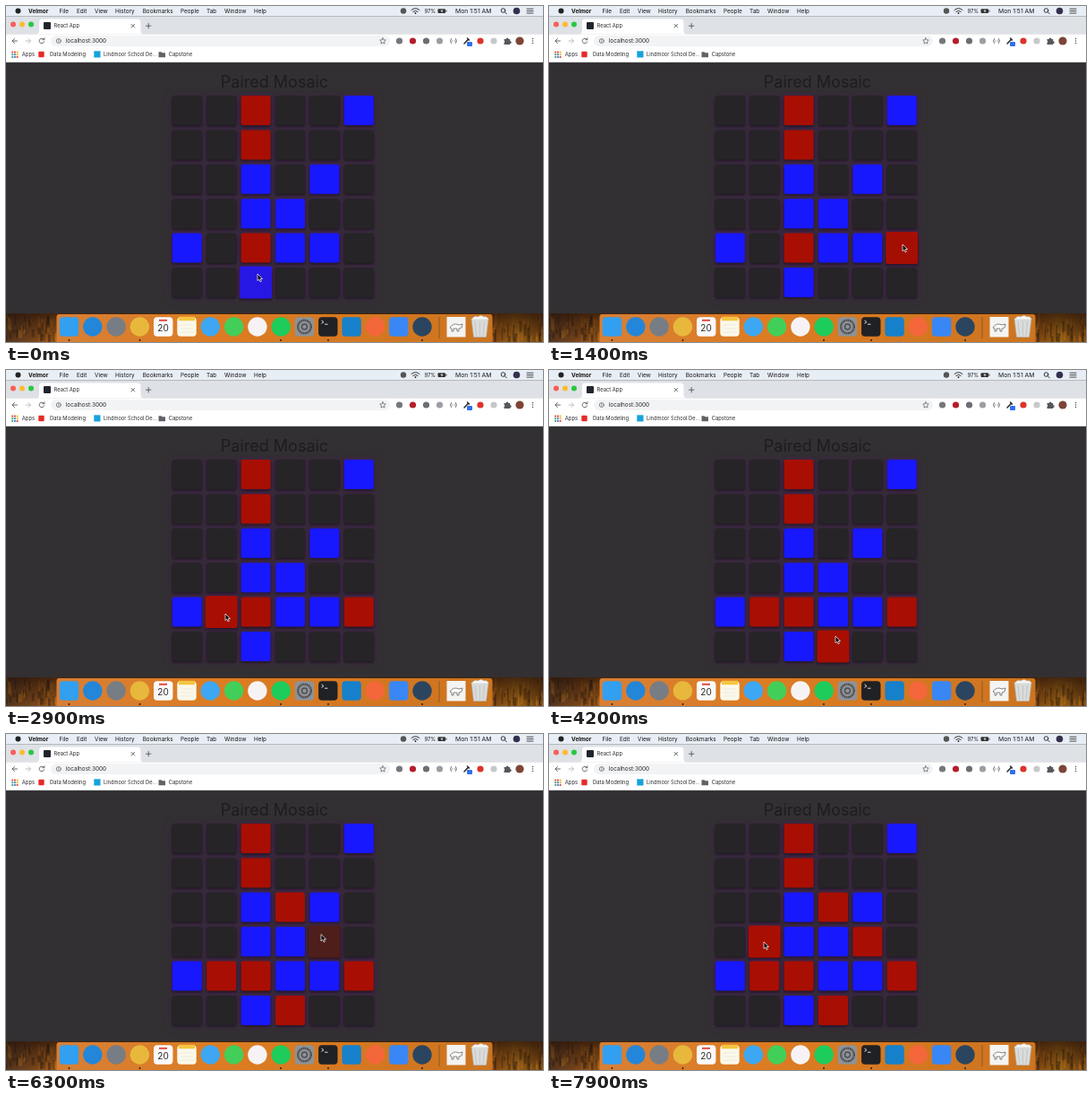
An HTML page that plays this animation: 600 px wide and 375 px high, repeating every 8000 ms.

```html
<!DOCTYPE html>
<html lang="en">
<head>
<meta charset="utf-8">
<title>Paired Mosaic</title>
<style>
  html, body { margin: 0; width: 100%; height: 100%; overflow: hidden; background: #323032; }
  svg { display: block; width: 100vw; height: 100vh; }
  text { font-family: Inter, "Liberation Sans", sans-serif; fill: #2b2b2d; }
  .menu { font-size: 6.4px; fill: #151515; }
  .small { font-size: 5.85px; }
  .line { fill: none; stroke: #56585c; stroke-width: .9; stroke-linecap: round; stroke-linejoin: round; }
</style>
</head>
<body>
<svg viewBox="0 0 600 375" preserveAspectRatio="none">
  <defs>
    <linearGradient id="wall">
      <stop offset="0" stop-color="#5a3a22"/><stop offset=".06" stop-color="#8a4f1c"/>
      <stop offset=".1" stop-color="#a8601a"/><stop offset=".9" stop-color="#8a4a12"/>
      <stop offset=".95" stop-color="#a86a16"/><stop offset="1" stop-color="#7a4612"/>
    </linearGradient>
    <linearGradient id="shade" x2="0" y2="1">
      <stop offset="0" stop-color="#1c0d08" stop-opacity=".7"/>
      <stop offset=".5" stop-color="#1c0d08" stop-opacity=".4"/>
      <stop offset="1" stop-color="#1c0d08" stop-opacity=".1"/>
    </linearGradient>
    <linearGradient id="shelf">
      <stop offset="0" stop-color="#d87f35"/><stop offset=".4" stop-color="#dc7c22"/>
      <stop offset="1" stop-color="#cc7420"/>
    </linearGradient>
    <filter id="soft" x="-20%" y="-20%" width="140%" height="140%"><feGaussianBlur stdDeviation="5"/></filter>
    <filter id="halo" x="-40%" y="-40%" width="180%" height="180%"><feGaussianBlur stdDeviation="2.2"/></filter>
    <filter id="lift" x="-30%" y="-30%" width="160%" height="160%"><feGaussianBlur stdDeviation="1.1"/></filter>
  </defs>

  <!-- page -->
  <rect y="62" width="600" height="282" fill="#323032"/>
  <text x="300" y="90.5" text-anchor="middle" font-size="18" style="fill:#1e1c1e">Paired Mosaic</text>
  <rect x="184" y="99" width="230" height="229" rx="4" fill="#3d2844" opacity=".45" filter="url(#soft)"/>
  <g id="board"></g>

  <!-- menu bar -->
  <rect width="600" height="11.5" fill="#e8eef5"/>
  <circle cx="13.5" cy="5.5" r="3" fill="#222"/>
  <g id="menus"></g>
  <circle cx="444" cy="5.5" r="3.2" fill="#555"/>
  <path class="line" d="M453 4.5q4.5-4 9 0M454.8 6.3q2.7-2.3 5.4 0" style="stroke:#222"/>
  <circle cx="457.5" cy="8" r=".9" fill="#222"/>
  <text class="menu" x="467.5" y="7.8" style="font-size:5.8px">97%</text>
  <rect x="482.5" y="3.2" width="8.5" height="4.8" rx="1" fill="#333"/>
  <rect x="491.4" y="4.6" width="1" height="2" fill="#333"/>
  <path d="M487.5 3.3l-2 2.7h1.5l-.5 2 2-2.8H487z" fill="#e8eef5"/>
  <text class="menu" x="502" y="7.8" style="font-size:6.8px">Mon 1:51 AM</text>
  <circle class="line" cx="555.5" cy="5" r="2.3" style="stroke:#222"/>
  <path class="line" d="M557.3 6.8l2 2" style="stroke:#222"/>
  <circle cx="570.5" cy="5.5" r="3.8" fill="#34304e"/>
  <path class="line" d="M582 3.2h7M582 5.6h7M582 8h7" style="stroke:#333"/>

  <!-- browser window -->
  <rect y="11.5" width="600" height="20" fill="#dee1e6"/>
  <circle cx="8" cy="20.5" r="3" fill="#fb5d57"/>
  <circle cx="18" cy="20.5" r="3" fill="#fcbc2e"/>
  <circle cx="28" cy="20.5" r="3" fill="#2ac840"/>
  <path d="M33 31.5q4 0 4-4V18q0-3.5 3.5-3.5H147q3.5 0 3.5 3.5v9.5q0 4 4 4z" fill="#fff"/>
  <rect x="42" y="18" width="8" height="8" rx="1" fill="#20252d"/>
  <text class="small" x="53.5" y="24.3">React App</text>
  <path class="line" d="M140 20.4l3.6 3.6m0-3.6l-3.6 3.6M156.5 22.2h5.4M159.2 19.5v5.4"/>
  <rect y="31.2" width="600" height="31.6" fill="#fff"/>
  <path class="line" d="M12.5 39h-5.5m2.5-2.6L7 39l2.5 2.6"/>
  <path class="line" d="M22 39h5.5m-2.5-2.6l2.5 2.6-2.5 2.6" style="stroke:#b9bbbe"/>
  <path class="line" d="M42.2 37.2a2.8 2.8 0 1 0 .5 2.6M42.9 35.7v2h-2"/>
  <rect x="50" y="33" width="379" height="12" rx="6" fill="#f1f3f4"/>
  <circle class="line" cx="58.8" cy="39" r="2.5" style="stroke-width:.7"/>
  <path class="line" d="M58.8 38.8v1.3M58.8 37.6v.1" style="stroke-width:.7"/>
  <text x="66.8" y="41.3" font-size="6.4">localhost:3000</text>
  <path class="line" d="M421 35.7l1 2.1 2.3.3-1.7 1.6.4 2.3-2-1.1-2 1.1.4-2.3-1.7-1.6 2.3-.3z" style="stroke-width:.7"/>
  <g id="tools"></g>
  <path class="line" d="M497.5 36.5q-2 2.5 0 5m5-5q2 2.5 0 5M498.8 39h.2m2.3 0h.2"/>
  <path class="line" d="M512 42l4.5-4.8m-1-1.2l2 2" style="stroke:#222;stroke-width:1.4"/>
  <rect x="515" y="40" width="6" height="5" rx="1" fill="#2f6fed"/>
  <path d="M556.5 37h2a1.5 1.5 0 0 1 3 0h1.7v2a1.5 1.5 0 0 1 0 3v1h-6.7v-2a1.5 1.5 0 0 0 0-2.5z" fill="#55585c"/>
  <circle cx="574" cy="39" r="4.6" fill="#7d4437"/>
  <g fill="#55585c"><circle cx="588.5" cy="36.5" r=".8"/><circle cx="588.5" cy="39" r=".8"/><circle cx="588.5" cy="41.5" r=".8"/></g>
  <g id="apps"></g>
  <text class="small" x="17.8" y="56.2">Apps</text>
  <rect x="36.3" y="50.8" width="6.4" height="6.4" rx="1" fill="#e62b28"/>
  <text class="small" x="49" y="56.2">Data Modeling</text>
  <rect x="98.3" y="50.3" width="7.2" height="7.2" fill="#16a2dc"/>
  <text class="small" x="109" y="56.2" style="font-size:5.7px">Lindmoor School De...</text>
  <path d="M170.5 51.3h3l1 1h3.5v5h-7.5z" fill="#5f6368"/>
  <text class="small" x="181.7" y="56.2">Capstone</text>
  <path d="M0 62.6h600" stroke="#d8d8da" stroke-width=".6"/>

  <!-- desktop and dock -->
  <rect y="343" width="600" height="32" fill="url(#wall)"/>
  <g id="streaks"></g>
  <rect y="343" width="600" height="32" fill="url(#shade)"/>
  <path d="M56.5 375V347q0-3 3-3h481q3 0 3 3V375z" fill="url(#shelf)"/>
  <g id="dock"></g>
  <path d="M484 347v24" stroke="#7c4c22" stroke-width=".7"/>
  <path d="M171 350.8h9" stroke="#e1493f" stroke-width="2"/>
  <text x="175.5" y="363.4" font-size="10" text-anchor="middle">20</text>
  <path d="M193 349h18" stroke="#f4c53f" stroke-width="4.5"/>
  <path d="M195 356h14M195 360h14M195 364h14" stroke="#dcdcd4" stroke-width=".5"/>
  <path d="M352.5 351l2.5 1.7-2.5 1.7m3.5.8h3.5" fill="none" stroke="#eee" stroke-width=".9"/>
  <g fill="none" stroke="#4a4c50"><circle cx="333.5" cy="358" r="7.3" stroke-width="2.4" stroke-dasharray="1.7 .6"/><circle cx="333.5" cy="358" r="3" stroke-width="1.4"/></g>
  <path d="M496 359q4-6 10-3l4-1-1 4-3 1v3h-2v-3h-4v3h-2v-3z" fill="#fff" stroke="#555" stroke-width=".7"/>
  <path d="M520 349h19l-2.5 20.5h-14z" fill="#dadcdb" stroke="#aeb2b2" stroke-width=".6"/>
  <path d="M524 352l1.6 16m3.9-16v16m5-16l-1.6 16" stroke="#b8bcbc" stroke-width=".7"/>
  <path d="M520 350q3-5 7-3 4-3 7 0 4-1 5 3z" fill="#f5f5f3" stroke="#c3c5c4" stroke-width=".5"/>

  <path id="cursor" d="M0 0v7.6l1.8-1.6 1.2 2.8 1.4-.6-1.2-2.7h2.4z" fill="#0a0a0a" stroke="#fff" stroke-width=".7" stroke-linejoin="round"/>
</svg>
<script>
const NS = 'http://www.w3.org/2000/svg';
const byId = id => document.getElementById(id);
function add(parent, tag, attrs, label) {
  const el = document.createElementNS(NS, tag);
  for (const key in attrs) el.setAttribute(key, attrs[key]);
  if (label) el.textContent = label;
  parent.appendChild(el);
  return el;
}

// Static repeats
[['Velmor', 25], ['File', 59.5], ['Edit', 79], ['View', 99], ['History', 122],
 ['Bookmarks', 152.7], ['People', 195], ['Tab', 224], ['Window', 244], ['Help', 277]]
  .forEach(([label, x], i) => add(byId('menus'), 'text',
    { x, y: 7.8, class: 'menu', 'font-weight': i ? 400 : 700 }, label));

[[439.5, '#74777c'], [454.5, '#b51f2b'], [469.5, '#6b6e73'], [484.5, '#9b9ea3'],
 [530, '#dc3328'], [545, '#c6c8ca']].forEach(([cx, fill]) =>
  add(byId('tools'), 'circle', { cx, cy: 39, r: 3.6, fill }));

['#e04a3f', '#e04a3f', '#f0b429', '#3ba55d', '#4285d8', '#f0b429', '#3ba55d', '#4285d8', '#e04a3f']
  .forEach((fill, i) => add(byId('apps'), 'rect',
    { x: 6.3 + i % 3 * 2.7, y: 50.6 + Math.floor(i / 3) * 2.7, width: 1.9, height: 1.9, fill }));

// Blurry reflections on the water either side of the dock
let seed = 7;
const random = () => (seed = seed * 16807 % 2147483647) / 2147483647;
for (let i = 0; i < 90; i++) {
  add(byId('streaks'), 'rect', {
    x: (i % 2 ? 543 : 0) + random() * 57, y: 343 + random() * 26,
    width: 1 + random() * 2, height: 4 + random() * 12,
    fill: random() < .5 ? '#d88a22' : '#2a1910', opacity: .4
  });
}

const icons = [
  ['#329ff0', 0], ['#2386d9', 1], ['#777d84', 1], ['#e7b83c', 1], ['#fafafa', 0], ['#fbf8e9', 0],
  ['#3da7f3', 1], ['#42cf59', 1], ['#f7f3f5', 1], ['#1dcc5b', 1], ['#8f9296', 0], ['#202124', 0],
  ['#1680ca', 0], ['#f4673a', 1], ['#3987f5', 0], ['#2b4560', 1]
];
icons.forEach(([fill, round], i) => add(byId('dock'), 'rect', {
  x: 70.5 + i * 26.3 - 10.7, y: 347.3, width: 21.4, height: 21.4, rx: round ? 10.7 : 4, fill
}));
add(byId('dock'), 'rect', { x: 492.5, y: 347, width: 21, height: 22.5, fill: '#f4f4f2' });
[70.5, 149.5, 307, 360, 465].forEach(cx =>
  add(byId('dock'), 'circle', { cx, cy: 373, r: .9, fill: '#1b120a' }));

// Board
const SIZE = 33, PITCH = 38.4, LEFT = 185.8, TOP = 100;
const DARK = [38, 36, 38], RED = [168, 15, 2], BLUE = [24, 24, 255];
const start = ['..r..b', '..r...', '..b.b.', '..bb..', 'b.rbb.', '..r...'];
const clicks = { '2,5': -480, '5,4': 850, '1,4': 2150, '3,5': 3600, '3,2': 5150, '4,3': 6080, '1,3': 7250 };
const FADE = 600, LOOP = 8000;

// A click turns dark to red and red to blue.
const cells = [];
start.forEach((row, r) => [...row].forEach((mark, c) => {
  const x = LEFT + c * PITCH, y = TOP + r * PITCH;
  const g = add(byId('board'), 'g', {});
  const box = { x, y, width: SIZE, height: SIZE, rx: 2.5 };
  const halo = add(g, 'rect', { ...box, fill: '#561a66', filter: 'url(#halo)' });
  add(g, 'rect', { ...box, y: y + 1.3, fill: '#171018', opacity: .75, filter: 'url(#lift)' });
  const face = add(g, 'rect', box);
  const from = mark === 'r' ? RED : mark === 'b' ? BLUE : DARK;
  cells.push({ x, y, g, halo, face, click: clicks[c + ',' + r], from, to: from === RED ? BLUE : RED });
}));

// Pointer stops: time, x, y
const path = [
  [0, 281, 299], [250, 281, 299], [800, 395, 266], [1500, 395, 266],
  [2050, 245, 272], [3000, 245, 272], [3500, 320, 297], [4300, 320, 297],
  [4900, 316, 200], [5400, 316, 200], [5950, 352, 223.5], [6500, 352, 223.5],
  [7100, 240, 232], [LOOP, 240, 232]
];
const clamp = v => Math.max(0, Math.min(1, v));
const ease = v => v * v * (3 - 2 * v);

function pointer(t) {
  t = Math.max(0, t);
  let i = 1;
  while (i < path.length - 1 && path[i][0] < t) i++;
  const [t0, x0, y0] = path[i - 1], [t1, x1, y1] = path[i];
  const k = ease(clamp((t - t0) / (t1 - t0)));
  return [x0 + (x1 - x0) * k, y0 + (y1 - y0) * k];
}

// Share of the recent past spent over a cell drives its hover growth.
function draw(t) {
  const trail = Array.from({ length: 10 }, (_, i) => pointer(t - i * 25));
  for (const { x, y, g, halo, face, click, from, to } of cells) {
    const over = trail.filter(([px, py]) =>
      px >= x && px <= x + SIZE && py >= y && py <= y + SIZE).length / trail.length;
    const cx = x + SIZE / 2, cy = y + SIZE / 2;
    g.setAttribute('transform',
      `translate(${cx} ${cy}) scale(${1 + .09 * ease(over)}) translate(${-cx} ${-cy})`);
    const k = click === undefined ? 0 : ease(clamp((t - click) / FADE));
    face.setAttribute('fill', `rgb(${from.map((v, i) => Math.round(v + (to[i] - v) * k))})`);
    halo.setAttribute('opacity', .35 + .4 * (from === DARK ? k : 1));
  }
  byId('cursor').setAttribute('transform', `translate(${trail[0]})`);
}

const began = performance.now();
function tick(now) {
  draw(Math.floor(Math.max(0, now - began) % LOOP / 100) * 100);
  requestAnimationFrame(tick);
}
draw(0);
requestAnimationFrame(tick);
</script>
</body>
</html>
```
